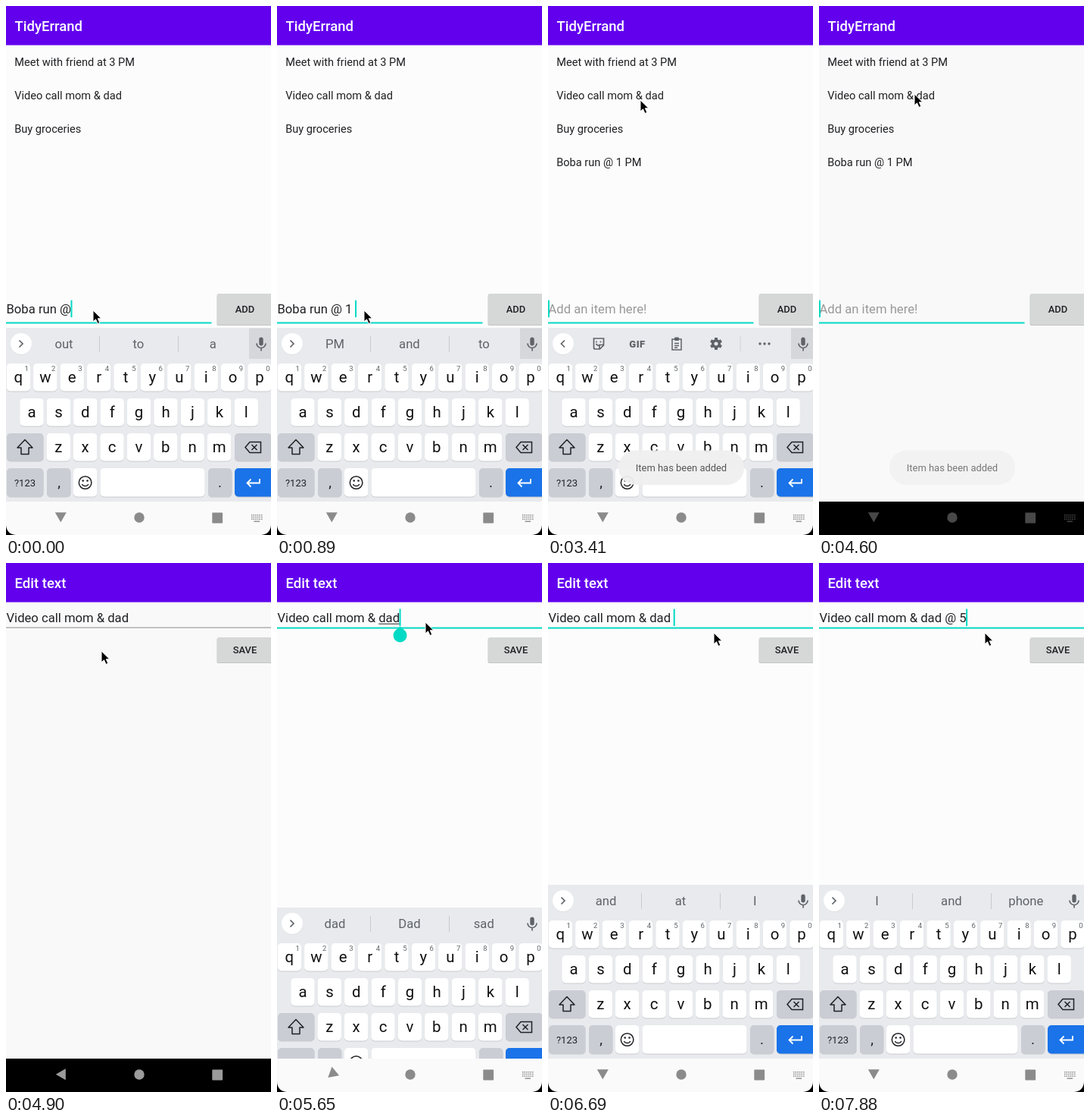
An HTML page for the animation above (8000 ms loop, 350 by 697 pixels).

```html
<!DOCTYPE html>
<html lang="en">
<head>
<meta charset="utf-8">
<title>Todo list</title>
<style>
  html, body { margin: 0; width: 100%; height: 100%; overflow: hidden; background: #fcfcfc; }
  svg { display: block; width: 100%; height: 100%; font-family: Roboto, sans-serif; }
</style>
</head>
<body>
<svg id="stage" viewBox="0 0 350 697"></svg>
<script>
const LOOP = 8000;
const TEAL = '#03dac5', GREY = '#5f6368', INK = '#202124';
const FIELD_SIZE = 16.65, FIELD_X = 0.5;
const stage = document.getElementById('stage');

const start = {
  page: 'list', items: 3, text: 'Boba run @', words: ['out', 'to', 'a'], mouse: [115, 401],
  caret: true, focus: true, pressed: false, toast: 0, keysDrop: 0, caps: false,
  navFill: '#fafafa', navInk: '#8b8b8b', backAngle: 0, handle: false, bg: '#fcfcfc'
};

// Each step changes part of the state and holds until the next one.
const steps = [
  [300, { text: 'Boba run @ ' }],
  [450, { text: 'Boba run @ 1' }],
  [590, { words: null }],
  [890, { text: 'Boba run @ 1 ', words: ['PM', 'and', 'to'] }],
  [1040, { text: 'Boba run @ 1 P', words: ['P', 'PM', 'Pm'] }],
  [1190, { text: 'Boba run @ 1 PM', words: ['PM', 'ON', 'OK'] }],
  [1490, { mouse: [180, 403] }],
  [1640, { mouse: [262, 405] }],
  [1780, { mouse: [296, 404], caret: false }],
  [2230, { pressed: true }],
  [2380, { text: '', items: 4, words: null, caret: true }],
  [2530, { toast: 0.5, pressed: false }],
  [2680, { toast: 0.94, mouse: [280, 360] }],
  [2830, { mouse: [215, 270], caret: false }],
  [2980, { mouse: [150, 185] }],
  [3110, { mouse: [122, 140] }],
  [3410, { mouse: [122, 124], caret: true }],
  [3560, { mouse: [126, 116] }],
  [3860, { caret: false }],
  [4450, { caret: true, keysDrop: 100 }],
  [4600, { keysDrop: 240, navFill: '#000', navInk: '#484848', bg: '#f9f9f9', toast: 0.75 }],
  [4750, { page: 'edit', text: 'Video call mom & dad', focus: false, caret: false, toast: 0.4, backAngle: 45 }],
  [4900, { toast: 0, backAngle: 90, navInk: '#9b9b9b' }],
  [5050, { mouse: [140, 108] }],
  [5200, { mouse: [175, 90] }],
  [5350, { mouse: [196, 78] }],
  [5500, { focus: true, caret: true, words: ['dad', 'Dad', 'sad'], keysDrop: 140, bg: '#fcfcfc' }],
  [5650, { handle: true, keysDrop: 30, navFill: '#fafafa', navInk: '#8b8b8b', backAngle: 50 }],
  [5800, { keysDrop: 1.3, backAngle: 15 }],
  [5950, { keysDrop: 0, backAngle: 0, mouse: [210, 86] }],
  [6100, { mouse: [219, 92] }],
  [6550, { text: 'Video call mom & dad ', words: ['and', 'at', 'I'], handle: false }],
  [6700, { caps: true }],
  [6850, { text: 'Video call mom & dad @', words: null }],
  [6980, { caps: false }],
  [7280, { text: 'Video call mom & dad @ ' }],
  [7580, { words: ['I', 'and', 'phone'] }],
  [7880, { text: 'Video call mom & dad @ 5' }]
];

const states = [start];
for (const [, change] of steps) states.push({ ...states[states.length - 1], ...change });

const ruler = document.createElement('canvas').getContext('2d');
function textWidth(text) {
  ruler.font = `${FIELD_SIZE}px Roboto, sans-serif`;
  return ruler.measureText(text).width;
}

const escapeText = s => s.replace(/&/g, '&amp;').replace(/</g, '&lt;');
const label = (x, y, s, size, fill = INK, extra = '') =>
  `<text x="${x}" y="${y}" font-size="${size}" fill="${fill}" ${extra}>${escapeText(s)}</text>`;
const centred = (x, y, s, size, fill, extra = '') =>
  label(x, y, s, size, fill, 'text-anchor="middle" ' + extra);
const rect = (x, y, w, h, fill, r = 0) =>
  `<rect x="${x}" y="${y}" width="${w}" height="${h}" rx="${r}" fill="${fill}"/>`;
const disc = (x, y, r, fill) => `<circle cx="${x}" cy="${y}" r="${r}" fill="${fill}"/>`;
const line = (d, colour, width = 1.7) =>
  `<path d="${d}" fill="none" stroke="${colour}" stroke-width="${width}"/>`;
const shape = (d, fill, extra = '') => `<path d="${d}" fill="${fill}" ${extra}/>`;

const key = (x, y, w, h, fill) => rect(x, y + 1, w, h, '#c9cbcf', 5) + rect(x, y, w, h, fill, 5);

function header(title) {
  return rect(0, 0, 350, 51.6, '#6200ee') +
    label(11.5, 33, title, 18.5, '#fff', 'font-weight="500"');
}

function button(y, h, name, pressed) {
  return rect(278.5, y + 1, 74, h, '#c2c3c3', 2) + rect(279, y, 73, h, pressed ? '#c3c4c4' : '#d6d7d7', 2) +
    centred(315.5, y + h / 2 + 4.5, name, 12.95, INK, 'font-weight="500"');
}

function field(s, baseline, lineY, width) {
  const end = FIELD_X + textWidth(s.text);
  const word = /[a-z]+$/i.exec(s.text);
  let out = s.focus ? rect(0, lineY, width, 2, TEAL) : rect(0, lineY, width, 1, '#8c8c8c');
  out += s.text ? label(FIELD_X, baseline, s.text, FIELD_SIZE)
    : label(FIELD_X, baseline, 'Add an item here!', FIELD_SIZE, '#999');
  if (word && s.focus) {
    const from = FIELD_X + textWidth(s.text.slice(0, word.index));
    out += rect(from, baseline + 1.7, end - from, 1, INK);
  }
  if (s.caret) out += rect(end - FIELD_X, baseline - 17.5, 2, 22.5, TEAL);
  if (s.handle) out += shape(`M${end + 0.5} 83.5l6.4 5.6a9 9 0 1 1-12.8 0z`, TEAL);
  return out;
}

function listPage(s) {
  const items = ['Meet with friend at 3 PM', 'Video call mom & dad', 'Buy groceries', 'Boba run @ 1 PM'];
  return header('TidyErrand') +
    items.slice(0, s.items).map((item, i) => label(11.2, 79.3 + i * 43.9, item, 14.6)).join('') +
    field(s, 405.2, 416.5, 271.5) + button(379, 41, 'ADD', s.pressed);
}

function editPage(s) {
  return header('Edit text') + field(s, 78, 84.6, 350) + button(98, 33, 'SAVE', false);
}

function gear(x, y) {
  let teeth = '';
  for (let i = 0; i < 6; i++) teeth += `<rect x="-2" y="-8" width="4" height="5" fill="${GREY}" transform="rotate(${i * 60})"/>`;
  return `<g transform="translate(${x} ${y})">${teeth}<circle r="4.3" fill="none" stroke="${GREY}" stroke-width="3.4"/></g>`;
}

function toolbar() {
  return line('M60.5 438h13v9l-5 5h-6a2 2 0 0 1-2-2zM73 446.5h-5v5M63.5 445q2.5 4 5 1', GREY) +
    disc(64, 442.5, 1, GREY) + disc(69.5, 442.5, 1, GREY) +
    centred(118, 449.6, 'GIF', 13, GREY, 'font-weight="900" letter-spacing="0.5"') +
    line('M164 439h12v14h-12zM167 444.5h6M167 447.5h6M167 450.2h4', GREY, 1.5) + rect(167, 436.5, 6, 4.5, GREY, 1) +
    gear(222, 445) + rect(253.5, 435, 1, 20, '#cfd1d5') +
    [280, 286, 292].map(x => disc(x, 445, 1.7, GREY)).join('');
}

function suggestions(words) {
  return rect(123, 435, 1, 21, '#c8cace') + rect(227, 435, 1, 21, '#c8cace') +
    words.map((word, i) => centred(76.5 + i * 98.4, 451.4, word, FIELD_SIZE, GREY)).join('');
}

function letterRows(caps) {
  const rows = [['qwertyuiop', 16.4, 471], ['asdfghjkl', 34, 517], ['zxcvbnm', 69.2, 563]];
  let out = '';
  for (const [letters, x0, y] of rows) {
    [...letters].forEach((c, i) => {
      const x = x0 + i * 35.4;
      out += key(x - 15.7, y, 31.4, 36.5, '#fff') +
        centred(x, y + 24.7, caps ? c.toUpperCase() : c, 20.4, '#111');
      if (y === 471) out += centred(x + 10.8, 480.5, String((i + 1) % 10), 9.5, GREY);
    });
  }
  return out;
}

function keyboard(s) {
  const soft = '#cacdd4';
  const chevron = s.words ? 'M17.5 440.5l4.5 4.5-4.5 4.5' : 'M22 440.5l-4.5 4.5 4.5 4.5';
  return `<g transform="translate(0 ${s.keysDrop})">` +
    rect(0, 424, 350, 240, '#e8eaed') +
    (s.page === 'list' ? rect(321, 424.5, 29, 40.5, '#d5d7db') : '') +
    disc(20, 445.7, 14, '#d7d9dc') + disc(20, 445, 14, '#fff') + line(chevron, GREY) +
    (s.words ? suggestions(s.words) : toolbar()) +
    rect(334.3, 436.5, 5.4, 11, GREY, 2.7) + line('M331 444.5a6 6 0 0 0 12 0M337 450.5v4', GREY) +
    letterRows(s.caps) +
    key(1, 563, 48.5, 36.5, soft) +
    shape('M25 571.5l10 10.5h-5v8.5h-10v-8.5h-5z', s.caps ? INK : 'none', `stroke="${INK}" stroke-width="1.5" stroke-linejoin="round"`) +
    key(302, 563, 49, 36.5, soft) +
    line('M322 574.5h14.5v14h-14.5l-6-7zM324.5 578l7 7M331.5 578l-7 7', INK, 1.5) +
    key(1, 609, 48.5, 37.5, soft) + centred(25, 633, '?123', 13, INK) +
    key(54, 609, 31.4, 37.5, soft) + centred(70, 634, ',', 19, INK) +
    key(89, 609, 31.4, 37.5, '#fff') +
    `<circle cx="104.6" cy="628" r="8.3" fill="none" stroke="${INK}" stroke-width="1.5"/>` +
    disc(101.7, 625.5, 1.3, INK) + disc(107.5, 625.5, 1.3, INK) + line('M100.4 630a4.7 4.7 0 0 0 8.4 0', INK, 1.5) +
    key(124.5, 609, 138, 37.5, '#fff') +
    key(267, 609, 31.4, 37.5, soft) + centred(282.5, 634, '.', 19, INK) +
    key(302, 609, 52, 37.5, '#1a73e8') +
    line('M335 623v5.5h-16M323.5 623.5l-5 5 5 5', '#fff', 1.8) +
    '</g>';
}

function navBar(s) {
  const ink = s.navInk;
  let out = rect(0, 653, 350, 44, s.navFill) +
    shape('M-7.5 -6.5h15l-7.5 13z', ink, `transform="translate(72.3 673.7) rotate(${s.backAngle})"`) +
    disc(176, 674, 6.7, ink) + rect(272.3, 667.5, 13.8, 14, ink, 1);
  if (s.backAngle < 90) {
    for (let row = 0; row < 3; row++)
      for (let col = 0; col < 6; col++) out += rect(324 + col * 2.6, 670 + row * 2.7, 1.5, 1.5, ink);
    out += rect(327.5, 678.4, 7.5, 1.4, ink);
  }
  return out + shape('M0 684q1 12 13 13h-13zM350 684q-1 12-13 13h13z', '#000');
}

function toast(alpha) {
  return `<g opacity="${alpha}">` + rect(93, 585.5, 166, 45.5, '#f0f0f0', 22.5) +
    centred(176, 613.2, 'Item has been added', 12.95, '#4c4c4c') + '</g>';
}

function pointer([x, y]) {
  return shape('M0 0v15l3.5-3.2 2.5 5.7 2.8-1.2-2.5-5.5h4.7z', '#000',
    `stroke="#fff" stroke-width="1" transform="translate(${x} ${y})"`);
}

function draw(s) {
  stage.innerHTML = rect(0, 0, 350, 697, s.bg) +
    (s.page === 'list' ? listPage(s) : editPage(s)) +
    (s.keysDrop < 240 ? keyboard(s) : '') + navBar(s) +
    (s.toast ? toast(s.toast) : '') + pointer(s.mouse);
}

let shown = -1;
const begin = performance.now();
function tick() {
  const t = (performance.now() - begin) % LOOP;
  const index = steps.filter(([at]) => at <= t).length;
  if (index !== shown) draw(states[shown = index]);
  requestAnimationFrame(tick);
}
tick();
</script>
</body>
</html>
```
